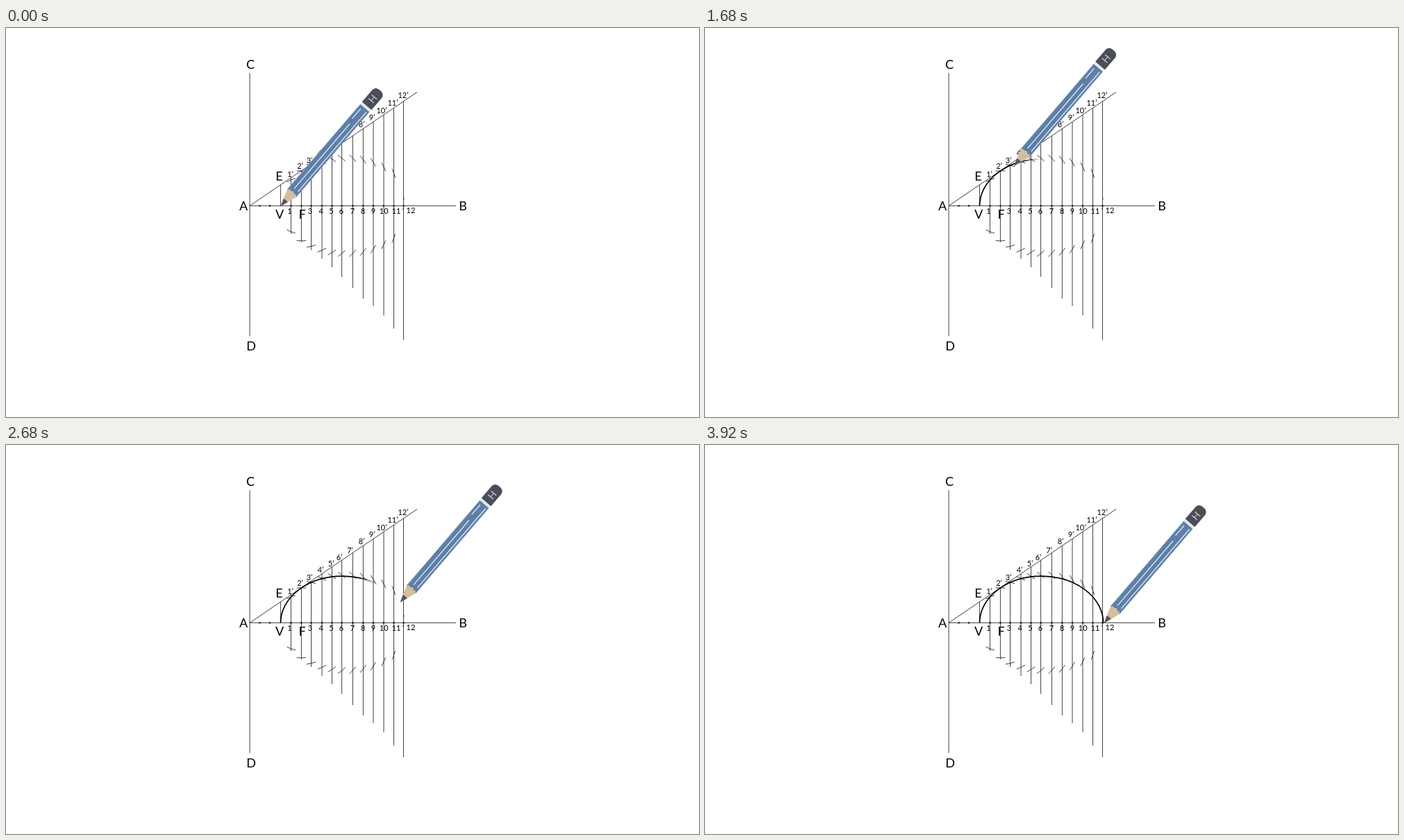
Animation, 998 px wide and 561 px high, one loop 3960 ms. Source, as an HTML page:

```html
<!DOCTYPE html>
<html lang="en">
<head>
<meta charset="utf-8">
<title>Ellipse construction</title>
<style>
  html, body { margin: 0; width: 100%; height: 100%; overflow: hidden; background: #fff; }
  svg { display: block; width: 998px; height: 561px; }
  text { font-family: Lato, "Open Sans", sans-serif; text-anchor: middle; fill: #000; }
  .big { font-size: 18px; }
  .small { font-size: 11px; }
  .thin { fill: none; stroke: #2b2b2b; stroke-width: 0.9; }
</style>
</head>
<body>
<svg viewBox="0 0 998 561">
  <defs>
    <linearGradient id="wipe" gradientUnits="userSpaceOnUse" x1="-27" y1="0" x2="0" y2="0">
      <stop offset="0" stop-color="#000"/>
      <stop offset="1" stop-color="#000" stop-opacity="0"/>
    </linearGradient>
  </defs>
  <g id="plan"></g>
  <path d="M395.5 256.5A89 67.3 0 0 1 573.5 256.5" fill="none" stroke="url(#wipe)" stroke-width="1.7"/>
  <g id="pencil">
    <path d="M10 -3.6L25 -8.6Q30 -6 27 -3Q31 0 27 3Q30 6 25 8.6L10 3.6Q12 0 10 -3.6Z" fill="#d5bd9f"/>
    <path d="M0 0L11 -4Q12.5 0 11 4Z" fill="#56565b"/>
    <path d="M24 -8.7H186.5V8.7H24Q29 6 26 3Q30 0 26 -3Q29 -6 24 -8.7Z" fill="#5d7fa8"/>
    <path d="M26 -8.3H186M26 8.3H186" stroke="#8fa5c0" stroke-width="0.8"/>
    <path d="M32 -1.7H155M163 -4H182M32 5.3H183" stroke="#e3eaf1" stroke-width="1.3"/>
    <path d="M187 -8.6H190V8.6H187Z" fill="#e4e6e8"/>
    <path d="M190.5 -9H213A7 7 0 0 1 220 -2V2A7 7 0 0 1 213 9H190.5Z" fill="#4b4e58"/>
    <text x="204" y="5" style="font-size:14px;fill:#c9ccd1">H</text>
  </g>
</svg>
<script>
const LOOP = 3960, STEP = 40, END = 3920;
const plan = document.getElementById('plan');
const pencil = document.getElementById('pencil');
const wipe = document.getElementById('wipe');

function add(tag, attrs, content = '') {
  const el = document.createElementNS('http://www.w3.org/2000/svg', tag);
  for (const key in attrs) el.setAttribute(key, attrs[key]);
  el.textContent = content;
  plan.append(el);
}
const line = d => add('path', { d, class: 'thin' });
const label = (s, x, y, cls) =>
  add('text', { x, y: y + (cls === 'big' ? 6.5 : 4), class: cls }, s);
const dot = x => add('circle', { cx: x, cy: 256.4, r: 1.2 });

// Axes, sloping line and first ordinate
line('M351 65V444M351 256.4H648M351 256.4L592 92.5M395.4 226V256.4');
[['C', 352, 52], ['D', 353, 458], ['A', 342, 256], ['B', 658, 256],
 ['E', 393.5, 213.5], ['V', 394, 268.5], ['F', 426.5, 268]]
  .forEach(([s, x, y]) => label(s, x, y, 'big'));
[365.5, 380].forEach(dot);

// Ordinates: line x, lower end, upper label x and y
const ordinates = [
  [410.4, 297, 409.5, 211], [425.4, 309, 423.5, 199], [439.5, 320, 437, 191],
  [455, 333, 453, 180], [469.5, 345, 468, 171], [483.6, 359, 480, 162],
  [499.4, 375, 495.5, 152], [514.4, 390, 512, 139], [529, 401, 527, 129],
  [544, 414.5, 541, 119], [558.5, 433.5, 557, 108], [572.5, 450, 572, 97]
];
const focus = [425.4, 256.4];

// Short compass mark about the focus, centred on ordinate x
function mark(x, radius, side) {
  const mid = Math.acos((x - focus[0]) / radius), half = 6.8 / radius;
  const at = a => `${focus[0] + radius * Math.cos(a)} ${focus[1] + side * radius * Math.sin(a)}`;
  line(`M${at(mid + half)}A${radius} ${radius} 0 0 ${side < 0 ? 1 : 0} ${at(mid - half)}`);
}

ordinates.forEach(([x, bottom, lx, ly], i) => {
  const n = i + 1, height = (x - 351) * 0.68;
  line(`M${x} ${256.4 - height}V${bottom}`);
  dot(x);
  label(n + '’', lx, ly, 'small');
  if (n !== 2) label(n, n === 12 ? 583 : n === 11 ? 562 : x - 2 + i * 0.25, n === 12 ? 262.5 : 263.5, 'small');
  if (n < 12) [-1, 1].forEach(side => mark(x, height, side));
});
line('M572.9 245V248M572.9 255Q572.9 259 571.6 262');

// Pencil path: time, shift right, shift up
const keys = [
  [0, 0, 0], [560, 0.4, 4], [1080, 5.5, 21.7], [1680, 49.5, 58], [1920, 86.5, 65.6],
  [2040, 105, 64.8], [2240, 136.5, 57.5], [2680, 172, 30], [2800, 176.5, 23.5],
  [3320, 178.6, 4.2], [3920, 179, 0]
];

function slope(i, c) {
  if (i === 0 || i === keys.length - 1) return 0;
  const a = keys[i - 1], b = keys[i + 1];
  return (b[c] - a[c]) / (b[0] - a[0]);
}

function sample(t, c) {
  let i = 0;
  while (i < keys.length - 2 && t > keys[i + 1][0]) i++;
  const a = keys[i], b = keys[i + 1], span = b[0] - a[0], u = (t - a[0]) / span;
  const v = 1 - u;
  return v * v * (1 + 2 * u) * a[c] + u * u * (3 - 2 * u) * b[c]
    + span * u * v * (v * slope(i, c) - u * slope(i + 1, c));
}

function draw(now) {
  const t = Math.floor(now % LOOP / STEP) * STEP;
  const x = 395.5 + sample(t, 1), y = 257 - sample(t, 2);
  pencil.setAttribute('transform', `translate(${x} ${y}) rotate(-49.4)`);
  wipe.setAttribute('gradientTransform', `translate(${394.5 + 207 * t / END} 0)`);
}

const start = performance.now();
function tick() {
  draw(performance.now() - start);
  requestAnimationFrame(tick);
}
tick();
</script>
</body>
</html>
```
